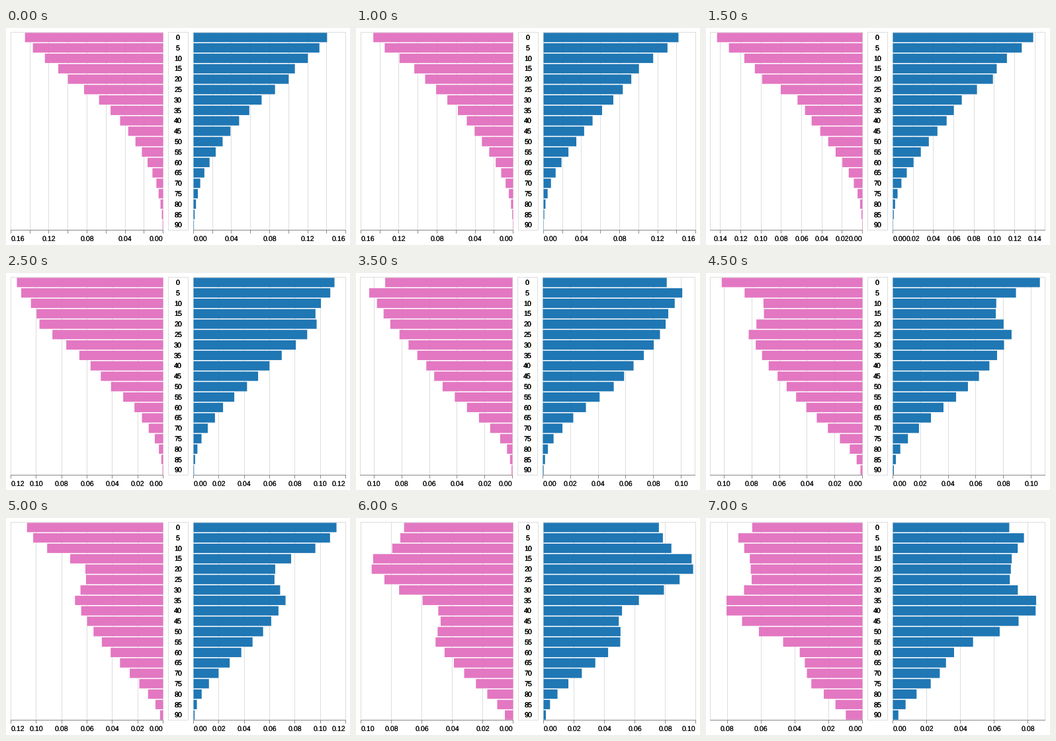
A matplotlib script that plays this animation: 520x329 px, repeating every 7500 ms.

```python
import matplotlib.pyplot as plt
import numpy as np
from matplotlib.animation import FuncAnimation
from matplotlib.patches import Rectangle

W, H, DPI = 520, 329, 64
PT = 72 / DPI
TOP, PLOT_W, PLOT_H = 6, 230, 300
BOTTOM = TOP + PLOT_H
PINK, BLUE = "#e377c2", "#1f77b4"
GRID, AXIS = "#dddddd", "#888888"

AGES = np.arange(0, 95, 5)
BAND = PLOT_H / len(AGES)
YEARS = [y for y in range(1850, 2001, 10) if y != 1890]
# upper end of the axis, in hundredths
LIMITS = [16, 16, 16, 15, 13, 12, 11, 11, 10, 11, 12, 11, 10, 9, 9]

# size of each generation (millions) at the turns of the birth curve
BORN = [1780, 1800, 1820, 1840, 1850, 1860, 1880, 1890, 1900, 1910, 1920, 1925,
        1935, 1940, 1945, 1950, 1955, 1960, 1965, 1970, 1975, 1985, 1995, 2000]
SIZE = [.19, .37, .73, 1.31, 1.58, 2.2, 3.55, 4.1, 4.7, 5.4, 5.95, 6.3,
        5.45, 5.5, 6.6, 8.3, 9.4, 10.4, 10.4, 9.1, 8.65, 9.1, 10.4, 9.8]

plt.rcParams["font.family"] = "Liberation Sans"
plt.rcParams["text.hinting"] = "none"


def pyramid(year, male):
    """Share of each age band: generations shrink as they grow old."""
    born = year - AGES
    people = np.exp(np.interp(born, BORN, np.log(SIZE)))

    # life spans lengthen, for women earlier than for men
    later = np.maximum(born - 1850, 0)
    span = 70.5 + 0.0015 * later ** 2 if male else 71.5 + 0.23 * later
    people *= np.exp(-(AGES / span) ** 5.38)

    # newcomers swell the young generations
    people *= 1 + 0.1 * np.minimum(AGES / 40, 1) * np.clip((born - 1910) / 40, -0.5, 1.5)
    if year < 1925:
        people *= 1 + 0.1 * np.exp(-((AGES - 21) / 6) ** 2)
    if male and year < 1935:
        people *= 1 + 0.1 * np.clip((AGES - 15) / 15, 0, 1)

    people[0] *= 0.96  # infants are undercounted
    return people / people.sum()


fig = plt.figure(figsize=(W / DPI, H / DPI), dpi=DPI, facecolor="white")
ax = fig.add_axes([0, 0, 1, 1])


def line(x0, y0, x1, y1, color):
    ax.plot([x0, x1], [y0, y1], color=color, lw=PT,
            solid_capstyle="butt", snap=False)


def outline(x, width):
    ax.add_patch(Rectangle((x + 0.5, TOP + 0.5), width, PLOT_H,
                           fill=False, ec=GRID, lw=PT, snap=False))


def label(x, y, text, strikes):
    """Overprinting thickens the digits."""
    for _ in range(strikes):
        ax.text(x, y, text, size=10.6 * PT, color="black",
                ha="center", va="baseline")


def panel(x, values, top, color, mirrored):
    """Draw one bar chart with its grid, axis and labels."""
    scale = PLOT_W / top
    base = x + PLOT_W if mirrored else x
    sign = -1 if mirrored else 1

    outline(x, PLOT_W)
    skip = 2 if 0.02 * scale < 30 else 1
    for k in range(int(round(top * 100)) // 2 + 1):
        tick = base + sign * 0.02 * k * scale
        snapped = round(tick) + 0.5
        line(snapped, TOP, snapped, BOTTOM, GRID)
        line(snapped, BOTTOM, snapped, BOTTOM + 5.5, AXIS)
        if k % skip == 0:
            center = np.clip(tick + 0.5, x + 10.5, x + PLOT_W - 10)
            label(center, BOTTOM + 17, f"{0.02 * k:.2f}", 2)
    line(x, BOTTOM + 0.5, x + PLOT_W + 1, BOTTOM + 0.5, AXIS)

    for i, value in enumerate(values):
        ax.add_patch(Rectangle((base + 0.5, TOP + 0.5 + BAND * (i + 0.05)),
                               sign * value * scale, BAND * 0.9,
                               fc=color, lw=0, snap=False, zorder=3))


def draw(frame):
    ax.clear()
    ax.set(xlim=(0, W), ylim=(H, 0))
    ax.axis("off")
    year, limit = YEARS[frame], LIMITS[frame]
    # a label on the outer edge pushes the layout one pixel right
    x = 7 if limit % 2 == 0 else 6
    panel(x, pyramid(year, False), limit / 100, PINK, True)
    outline(x + 238, 30)
    panel(x + 276, pyramid(year, True), limit / 100, BLUE, False)
    for i, age in enumerate(AGES):
        label(x + 253, TOP + BAND * (i + 0.5) + 4.1, str(age), 3)
    return ax.get_children()


anim = FuncAnimation(fig, draw, frames=len(YEARS), interval=500,
                     repeat=True, repeat_delay=0, blit=False)
plt.show()
```
